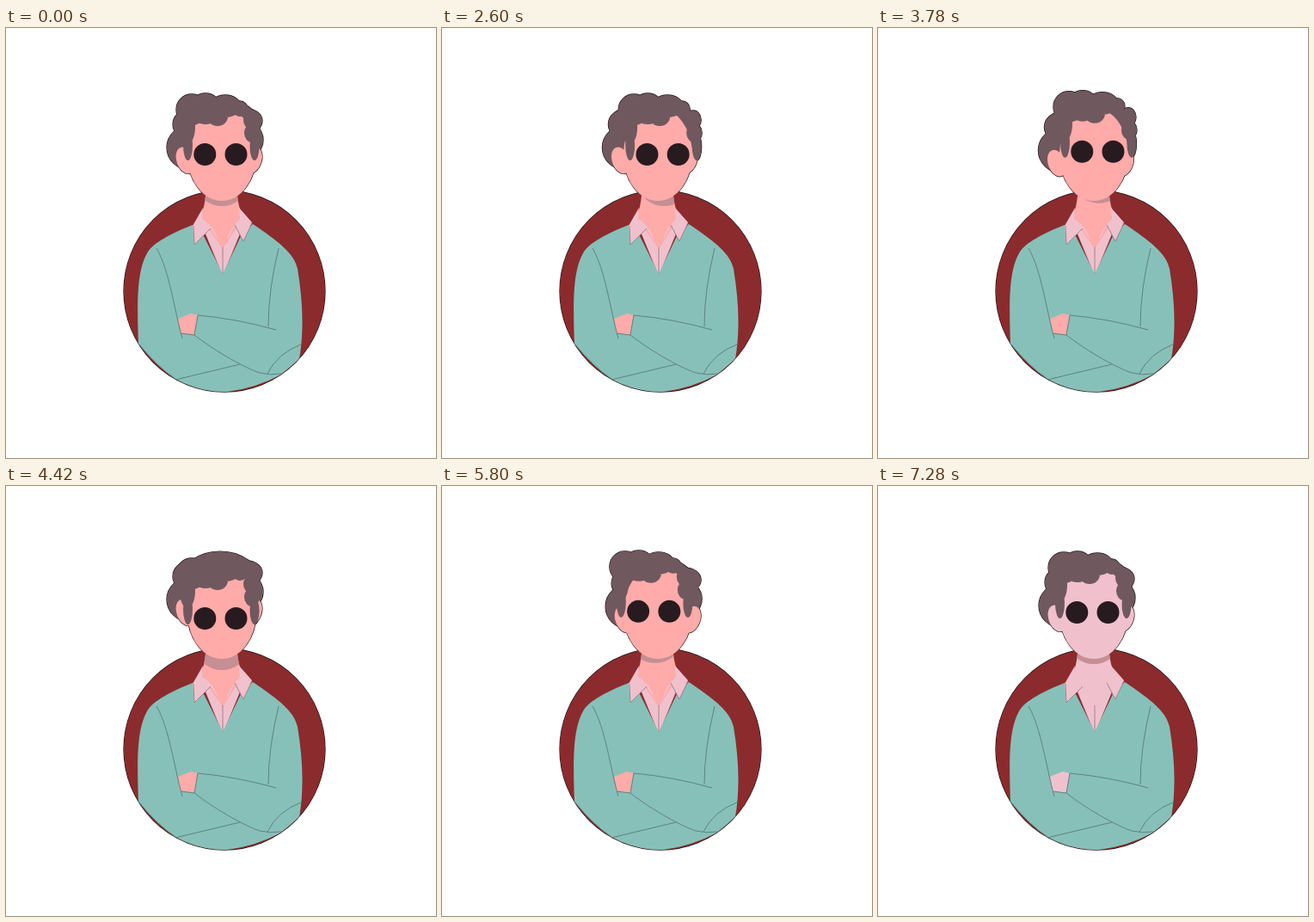
Recreate the animation shown at these times as an HTML page with a canvas. Size 500 by 500 pixels, loop 7.32 s.

```html
<!DOCTYPE html>
<html lang="en">
<head>
<meta charset="utf-8">
<title>Looking around</title>
<style>
html, body { margin: 0; width: 100%; height: 100%; overflow: hidden; background: #fff; }
canvas { display: block; width: 500px; height: 500px; }
</style>
</head>
<body>
<canvas id="stage" width="500" height="500"></canvas>
<script>
const ctx = document.getElementById('stage').getContext('2d');
const LOOP = 7320, MOVE = 500, BLINK = 7280;
const HAIR = '#70585f', SKIN = '#ffaba9', PINK = '#f0c1cd', WOOL = '#87c0b9';
const RED = '#8b2b2d', LENS = '#281b1f', SHADE = '#c58f93', SEAM = '#5f827e', EDGE = '#1c1214';
const LEFT = -4, RIGHT = 7.2, UP = -5.4, DOWN = 7;

// Each turn of the head: start time, sideways and vertical goal
const TURNS = [
  [100, LEFT, 0], [1500, RIGHT, 0], [2600, RIGHT, UP], [3650, 0, DOWN],
  [4750, LEFT, 0], [5650, 0, UP], [6650, 0, 0]
];

function headShift(t) {
  let x = 0, y = 0;
  for (const [start, goalX, goalY] of TURNS) {
    const u = Math.min(1, Math.max(0, (t - start) / MOVE));
    const e = u * u * (3 - 2 * u);
    x += (goalX - x) * e;
    y += (goalY - y) * e;
  }
  return [x, y];
}

// One shape made of ovals: x, y, rx, ry, tilt
function ovals(...list) {
  const path = new Path2D();
  for (const [x, y, rx, ry = rx, tilt = 0] of list) {
    const part = new Path2D();
    part.ellipse(x, y, rx, ry, tilt, 0, Math.PI * 2);
    path.addPath(part);
  }
  return path;
}

const disc = ovals([254, 306, 117]);
const face = ovals([251, 147, 40, 54]);
const ears = ovals([208.5, 154, 10, 16, -0.35], [287, 154, 10, 16, 0.35]);
const lenses = ovals([231.3, 147, 13], [267.5, 147, 13]);
const chinShade = ovals([251, 186, 27, 21]);
const cap = ovals([249, 115, 46, 34]);
const backHair = ovals([214, 139, 27, 26], [215, 112, 21, 18], [276, 130, 23, 22], [280, 108, 18, 14]);
const curls = ovals([216, 95, 18], [232, 94, 18], [255, 91, 18, 13], [246, 103, 12, 11],
  [272, 94, 9], [285, 107, 9, 11], [286, 122, 9, 11]);
const sideburns = ovals([211, 115, 9, 20], [211.5, 136, 5.5, 18], [289, 138, 5.5, 16]);
const frontHair = new Path2D(curls);
frontHair.addPath(sideburns);

const neck = new Path2D('M232 180V195Q231 208 226 220L252 257L276 220Q270 208 269 195V180Z');
const sweater = new Path2D(
  'M217 229C194 238 170 250 164 262C153 282 152 312 154 367Q176 394 197 408' +
  'Q220 424 248 424Q286 421 320 403L341 385Q349 340 339 280C335 262 318 249 287 228' +
  'L274 240L252 286L229 240Z');
const shirt = new Path2D('M226 225L252 288L278 225Z');
const collar = new Path2D(
  'M229 209L217 230L219 252L238 233L247 247Q243 231 228 222Z' +
  'M271 209L286 226L276 248L266 229L257 247Q259 234 272 222Z');
const shirtSeams = new Path2D('M218 230L219 252L238 233M266 229L276 248L286 227M252 255V286');
const hand = new Path2D('M200 338L215 332L223 334L219 357L203 355Z');
const sleeves = new Path2D(
  'M175 256C190 282 195 325 205 361M317 256Q305 305 305 347' +
  'M203 355L219 357L223 334Q268 338 314 351M219 357C246 378 280 396 295 401Q307 404 320 402' +
  'M304 402Q316 378 343 368M197 409L272 391M154 367Q176 394 197 408');

function fill(path, color) {
  ctx.fillStyle = color;
  ctx.fill(path);
}

function line(path, color, width) {
  ctx.strokeStyle = color;
  ctx.lineWidth = width;
  ctx.stroke(path);
}

function shifted(x, y, paint) {
  ctx.save();
  ctx.translate(x, y);
  paint();
  ctx.restore();
}

function clipped(path, paint) {
  ctx.save();
  ctx.clip(path);
  paint();
  ctx.restore();
}

function drawBody(skin, x, y) {
  fill(shirt, PINK);
  fill(neck, skin);
  clipped(neck, () => shifted(x, y, () => fill(chinShade, SHADE)));
  clipped(disc, () => fill(sweater, WOOL));
  fill(collar, PINK);
  line(shirtSeams, '#937f86', 0.9);
  fill(hand, skin);
  line(sleeves, SEAM, 1);
}

function draw(t) {
  const [x, y] = headShift(t);
  // The back of the head swings against the front
  const backX = Math.max(-x, -0.6), backY = -y;
  const skin = t < BLINK ? SKIN : PINK;
  const layers = [
    [backHair, HAIR, backX, backY],
    [cap, HAIR, 0, -0.7 * y],
    [ears, skin, backX, backY],
    [face, skin, 0, 0],
    [frontHair, HAIR, x, y]
  ];
  ctx.fillStyle = '#fff';
  ctx.fillRect(0, 0, 500, 500);
  for (const [path, , dx, dy] of layers) shifted(dx, dy, () => line(path, EDGE, 1.3));
  line(disc, EDGE, 1.3);
  fill(disc, RED);
  drawBody(skin, x, y);
  for (const [path, color, dx, dy] of layers) shifted(dx, dy, () => fill(path, color));
  shifted(x, y, () => fill(lenses, LENS));
}

const start = performance.now();
function tick() {
  draw((performance.now() - start) % LOOP);
  requestAnimationFrame(tick);
}
tick();
</script>
</body>
</html>
```
